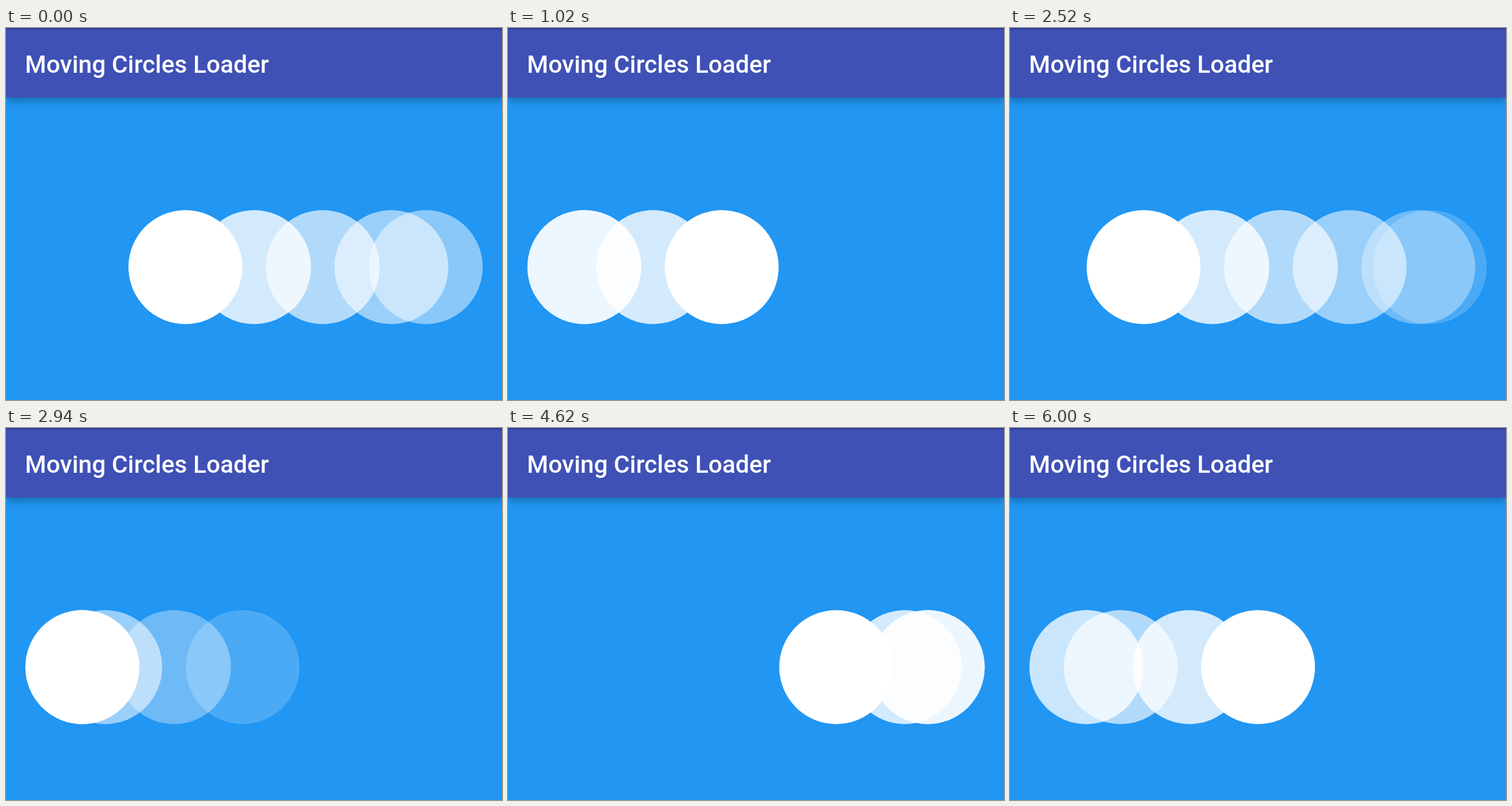
Recreate the animation shown at these times as an HTML page. Size 864 px wide and 648 px high, loop 6.06 s.

```html
<!DOCTYPE html>
<html lang="en">
<head>
<meta charset="utf-8">
<title>Moving Circles Loader</title>
<style>
  html, body { margin: 0; width: 100%; height: 100%; overflow: hidden; background: #2196f3; }
  svg { position: absolute; left: 0; top: 0; display: block; }
  header {
    position: absolute; left: 0; top: 0; width: 864px; height: 120.5px;
    background: linear-gradient(#303f9f 2.5px, #3f51b5 2.5px);
    box-shadow: 0 5px 14px rgba(0, 0, 0, .32);
  }
  text { font: 500 42.5px Roboto, sans-serif; fill: #fff; }
</style>
</head>
<body>
<svg id="stage" width="864" height="648"></svg>
<header>
  <svg width="864" height="120"><text x="33" y="78.4">Moving Circles Loader</text></svg>
</header>
<script>
const LOOP = 6060, STEP = 60;
const LEFT = 133, RIGHT = 731.2, CENTER_Y = 416.5, RADIUS = 99.2;
const TRAVEL = 600, DELAY = 120;
const ALPHAS = [1, .8, .65, .545, .345, .19]; // leader first, then its followers
const LEG_STARTS = [-420, 780, 2020, 3220, 4460, 5700]; // even legs run left, odd legs run right

const stage = document.getElementById('stage');
const circles = ALPHAS.map(alpha => {
  const circle = document.createElementNS('http://www.w3.org/2000/svg', 'circle');
  circle.setAttribute('cy', CENTER_Y);
  circle.setAttribute('r', RADIUS);
  circle.setAttribute('fill', '#fff');
  circle.setAttribute('fill-opacity', alpha);
  stage.prepend(circle); // the leader stays on top
  return circle;
});

function draw(time) {
  const t = Math.floor((time % LOOP) / STEP) * STEP;
  const leg = LEG_STARTS.filter(start => start <= t).length - 1;
  const [from, to] = leg % 2 ? [LEFT, RIGHT] : [RIGHT, LEFT];
  circles.forEach((circle, i) => {
    const progress = (t - LEG_STARTS[leg] - i * DELAY) / TRAVEL;
    const clamped = Math.min(1, Math.max(0, progress));
    circle.setAttribute('cx', from + (to - from) * clamped);
  });
}

const start = performance.now();
function tick(now) {
  draw(Math.max(0, now - start));
  requestAnimationFrame(tick);
}
draw(0);
requestAnimationFrame(tick);
</script>
</body>
</html>
```
